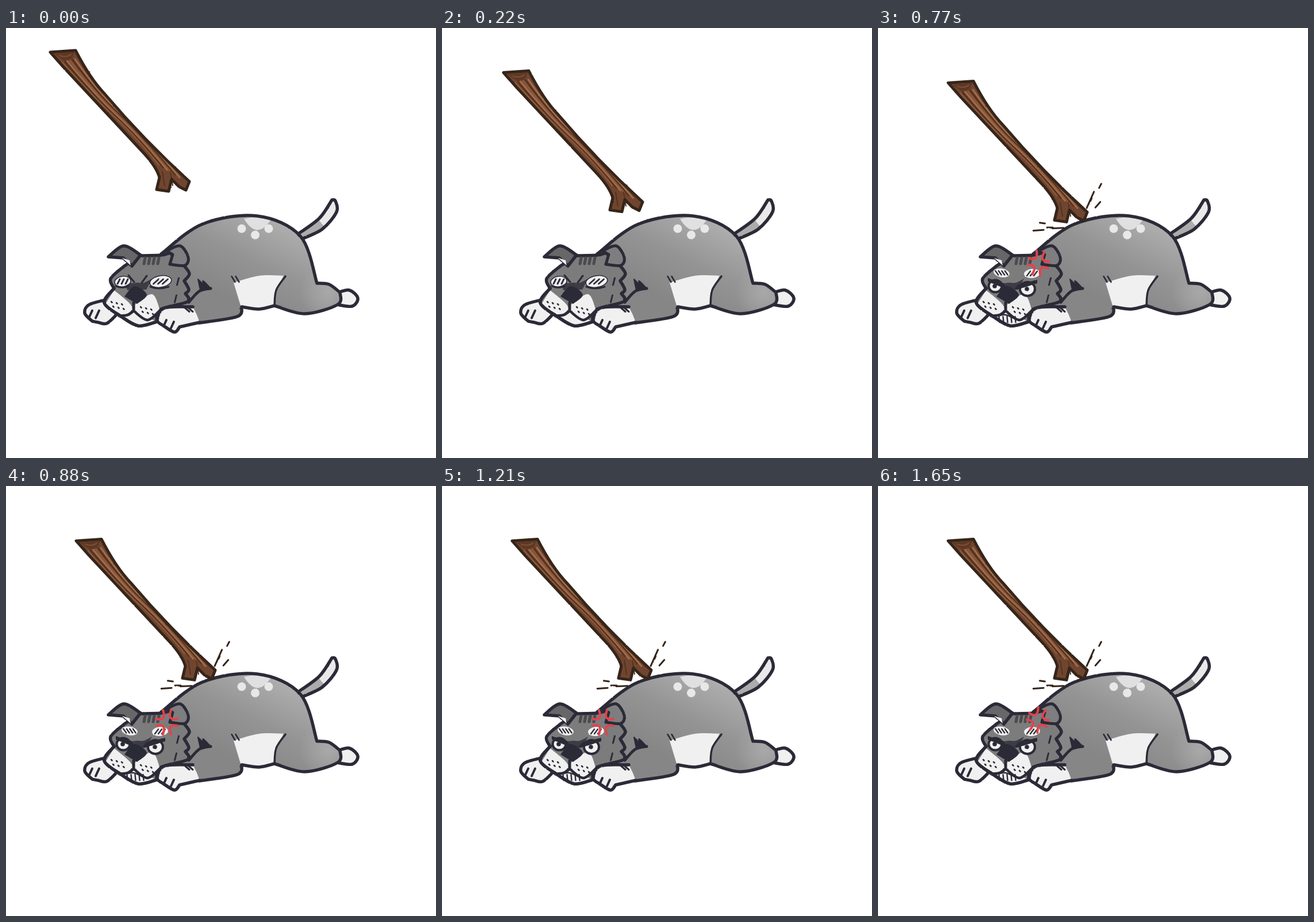
These frames come from a looping animation (748 px wide and 748 px high, 1.76 s). An HTML page:

```html
<!DOCTYPE html>
<html lang="en">
<head>
<meta charset="utf-8">
<title>Poking a sleepy dog</title>
<style>
  html, body { margin: 0; width: 100%; height: 100%; overflow: hidden; background: #fff; }
  svg { display: block; width: 100vw; height: 100vh; }
</style>
</head>
<body>
<svg viewBox="0 0 748 748" fill="none" stroke-linecap="round" stroke-linejoin="round">
  <defs>
    <linearGradient id="coat" gradientUnits="userSpaceOnUse" x1="395" y1="475" x2="465" y2="335">
      <stop offset="0" stop-color="#868687"/>
      <stop offset=".5" stop-color="#949494"/>
      <stop offset="1" stop-color="#adadad"/>
    </linearGradient>
    <radialGradient id="thigh" gradientUnits="userSpaceOnUse" cx="560" cy="460" r="50">
      <stop offset="0" stop-color="#a8a8a8"/>
      <stop offset="1" stop-color="#a8a8a8" stop-opacity="0"/>
    </radialGradient>
    <filter id="rough" filterUnits="userSpaceOnUse" x="0" y="0" width="748" height="748" color-interpolation-filters="sRGB">
      <feTurbulence type="fractalNoise" baseFrequency=".2" numOctaves="2" seed="4"/>
      <feDisplacementMap in="SourceGraphic" scale="1.6" xChannelSelector="R" yChannelSelector="G"/>
    </filter>
  </defs>
  <g filter="url(#rough)">
    <g id="dog"></g>
    <g id="asleep"></g>
    <g id="awake"></g>
    <g id="angry"></g>
    <g id="mark"></g>
    <g id="sparks"></g>
    <g id="stick"></g>
  </g>
</svg>
<script>
const INK = '#2b2a37', WHITE = '#f0f0f0', HEAD = '#7c7c7d', MASK = '#3d3c44', BARK = '#36251a';
const STEP = 110, STEPS = 16, WAKE = 3, ANGER = 7;
const $ = id => document.getElementById(id);
let layer;

function add(tag, attrs) {
  const el = document.createElementNS('http://www.w3.org/2000/svg', tag);
  for (const k in attrs) el.setAttribute(k, attrs[k]);
  return $(layer).appendChild(el);
}

// Smooth curve through the points; "|" after a point makes it a corner.
function smooth(text) {
  let d = '', last = null;
  for (const part of text.split('|')) {
    const p = part.trim().split(/\s+/).map(s => s.split(',').map(Number));
    if (last) p.unshift(last); else d = 'M' + p[0];
    for (let i = 0; i < p.length - 1; i++) {
      const a = p[i - 1] || p[i], b = p[i], c = p[i + 1], e = p[i + 2] || c;
      const c1 = b.map((v, k) => v + (c[k] - a[k]) / 6);
      const c2 = c.map((v, k) => v - (e[k] - b[k]) / 6);
      d += `C${c1} ${c2} ${c}`;
    }
    last = p[p.length - 1];
  }
  return d;
}
const path = (d, fill, stroke = 'none', w = 5.5) => add('path', { d, fill, stroke, 'stroke-width': w });
const shape = (pts, fill, stroke, w) => path(smooth(pts) + 'Z', fill, stroke, w);
const line = (pts, w, stroke = INK) => path(smooth(pts), 'none', stroke, w);
const oval = (cx, cy, rx, ry, fill = WHITE, stroke = 'none', w = 0, turn = 0) =>
  add('ellipse', { cx, cy, rx, ry, fill, stroke, 'stroke-width': w, transform: `rotate(${turn} ${cx} ${cy})` });

// A row of n parallel strokes centred on (x, y).
function hatch(n, x, y, gap, dx, dy, w, stroke = INK, slope = 0) {
  for (let i = 0; i < n; i++) {
    const k = i - (n - 1) / 2;
    path(`M${x + k * gap - dx / 2} ${y + k * slope - dy / 2}l${dx} ${dy}`, 'none', stroke, w);
  }
}

function whiskers(cx, cy) {
  for (let i = 0; i < 6; i++) {
    const col = i % 3 - 1, row = Math.floor(i / 3);
    path(`M${cx + col * 9 + row * 3} ${cy + row * 8 + col * 2}l1.5 1.5`, 'none', INK, 2.5);
  }
}

function drawBody() {
  layer = 'dog';
  const tail = '507,359 545,331 567,299 | 573,301 575,320 550,350 512,368';
  shape(tail, '#acacac');
  shape('544,334 567,300 | 574,304 574,322 555,347', '#e9e9e9');
  line(tail, 5.5);

  shape('178,472 145,481 137,496 150,510 | 160,512 175,514 192,499', WHITE, INK);
  hatch(2, 153, 498, 12, -6, 13, 4);
  shape('575,461 597,456 612,470 602,484 575,481', WHITE, INK);

  const trunk = '270,393 342,341 437,327 512,362 541,444 | 562,446 581,460 | 577,481 520,497 467,483 | 440,489 410,485 | 402,502 336,513';
  for (const paint of ['url(#coat)', 'url(#thigh)']) shape(trunk + ' | 300,480', paint);
  shape('396,443 440,431 483,431 | 470,458 467,483 | 440,489 409,486', WHITE);
  path('M414 332Q437 326 461 333Q437 370 414 332Z', '#e0e0e0');
  for (const side of [-1, 0, 1]) oval(433.5 + side * 23.5, 360 - Math.abs(side) * 11, 7.5, 7.5, '#e8e8e8');
  line(trunk, 5.5);
  line('486,432 470,456 467,483', 3.5);
  hatch(2, 399, 437, 7, 6, 10, 2.5);

  line('356,453 336,458 318,477', 5);
  shape('334,437 344,447 | 343,440 356,453 | 338,456', INK, INK, 2);
}

function drawHead() {
  layer = 'dog';
  const jaw = '199,501 230,518 262,511';
  shape('206,414 182,436 188,453 | 171,478 199,501 | 230,518 262,511 | 268,490 316,476 312,462 | 318,455 310,440 | 319,428 312,416 | 285,391 | 270,395 233,396', HEAD, INK);
  shape(jaw + ' | 222,491', WHITE);
  shape('188,456 213,477 223,491 | 197,500 173,480', WHITE);
  shape('223,482 254,463 268,491 | 247,508 222,491', WHITE);
  line('222,478 222,492 | 212,499 197,501', 5);
  line('222,492 246,508 269,490', 4.5);
  line('188,453 171,478 199,501 | 230,518 262,511', 5.5);
  whiskers(192, 478);
  whiskers(243, 487);

  shape('205,437 219,444 | 229,443 | 240,443 254,436 | 244,455 | 211,456', MASK);
  shape('206,467 224,449 245,464 228,480', INK);
  hatch(2, 297, 456, -4, -3, 12, 3, INK, 30);
  hatch(4, 253, 405, 8, -2, 10, 5, '#4b4b4f');

  shape('178,398 205,379 234,395 | 219,414 | 204,400', '#67676a', INK);
  shape('202,400 215,404 | 217,413', WHITE);
  shape('279,388 303,379 317,399 311,413 285,411 | 290,394', '#7e7e80', INK, 5);

  const paw = '325,485 276,487 263,508 274,518 | 293,529 302,520 | 337,512';
  shape(paw + ' | 332,499', WHITE);
  line(paw, 5.5);
  hatch(2, 283, 515, 13, -5, 11, 4, INK, 3);
  hatch(2, 318, 490, 6, 8, 7, 3);
}

function drawFaces() {
  layer = 'asleep';
  oval(203, 441, 14, 9, WHITE, INK, 1.5, -8);
  oval(269, 441, 19, 10, WHITE, INK, 1.5, -10);
  hatch(3, 203, 441, 7, -4, 8, 2.8);
  hatch(3, 269, 441, 8, -9, 8, 2.8);
  path('M191 449q10 5 22 0M251 450q15 6 32 0M213 430l10 12M245 431l-9 12', 'none', INK, 3);

  layer = 'awake';
  oval(215, 426, 14, 7.5, WHITE, 'none', 0, 10);
  oval(268, 427, 14, 8, WHITE, 'none', 0, -5);
  hatch(4, 215, 426, 5.5, 5, 7, 2.2);
  hatch(3, 268, 427, 6, -6, 8, 2.2);
  for (const [x, y, r] of [[204, 449, 11.5], [260, 454, 13]]) {
    oval(x, y, r, r - 1, WHITE, INK, 4);
    oval(x - 1, y, 3.8, 3.8, INK);
  }

  layer = 'angry';
  shape('191,435 218,444 | 222,453 191,441', INK);
  shape('277,438 244,446 | 240,455 277,444', INK);
  hatch(5, 225, 507, 7, 1, 10, 2.4);
  line('204,501 222,499 240,507', 2.5);

  layer = 'mark';
  for (const sx of [-1, 1]) for (const sy of [-1, 1])
    path(`M${sx * 7} ${sy * 21}Q${sx * 3} ${sy * 10} ${sx * 7} ${sy * 7}T${sx * 18} ${sy * 6}`, 'none', '#e5424a', 4);
}

function drawStick() {
  layer = 'stick';
  const rim = 'M77 42L121 39Q146 88 172 115Q240 195 319 267L313 282L301 276L288 263L283 284L262 281L267 260Q262 242 240 218L100 68Z';
  path(rim, '#70452f');
  // grain runs from the cut end to the fork, narrowing on the way
  for (let i = 0; i < 6; i++) {
    const across = i / 5, tone = ['#8a583c', '#53331f', '#a56c4b'][i % 3];
    const x = 98 + across * 22, y = 60 - across * 6;
    path(`M${x} ${y}Q${150 + across * 10} ${118 - across * 6} ${190 + across * 8} ${155 - across * 8}T${266 + across * 36} ${238 + across * 22}`, 'none', tone, 3);
  }
  hatch(2, 281, 262, 14, 4, 24, 2, '#53331f');
  path('M84 45L119 42L114 54L101 57Z', '#5d3824');
  path('M93 48q12 4 20-2', 'none', '#805036', 2);
  path(rim, 'none', BARK, 5);

  // dashes fly out from the point of contact: angle, distance, length
  layer = 'sparks';
  const dashes = [[178, 25, 20], [180, 44, 10], [176, 60, 18], [187, 58, 9],
                  [-66, 37, 31], [-62, 78, 8], [-49, 46, 13], [-65, 51, 5]];
  for (const [angle, from, len] of dashes) {
    const c = Math.cos(angle * Math.PI / 180), s = Math.sin(angle * Math.PI / 180);
    path(`M${348 + c * from} ${347 + s * from}l${c * len} ${s * len}`, 'none', BARK, 3);
  }
}

drawBody();
drawHead();
drawFaces();
drawStick();

const show = (id, on) => $(id).style.display = on ? '' : 'none';
const start = performance.now();
let shown = -1;

function pose(step) {
  const push = Math.min(step, WAKE);
  $('stick').setAttribute('transform', `translate(${push * 15} ${push * 17.8})`);
  show('asleep', step < WAKE);
  show('awake', step >= WAKE);
  show('sparks', step >= WAKE);
  show('angry', step >= ANGER);
  show('mark', step >= ANGER);
  const tilt = 20 - 10 * ((step + STEPS - ANGER) % 3);
  $('mark').setAttribute('transform', `translate(${280 - tilt * .1} ${411 - tilt * .2}) rotate(${tilt})`);
}

function tick() {
  const step = Math.floor((performance.now() - start) / STEP) % STEPS;
  if (step !== shown) pose(shown = step);
  requestAnimationFrame(tick);
}
tick();
</script>
</body>
</html>
```
